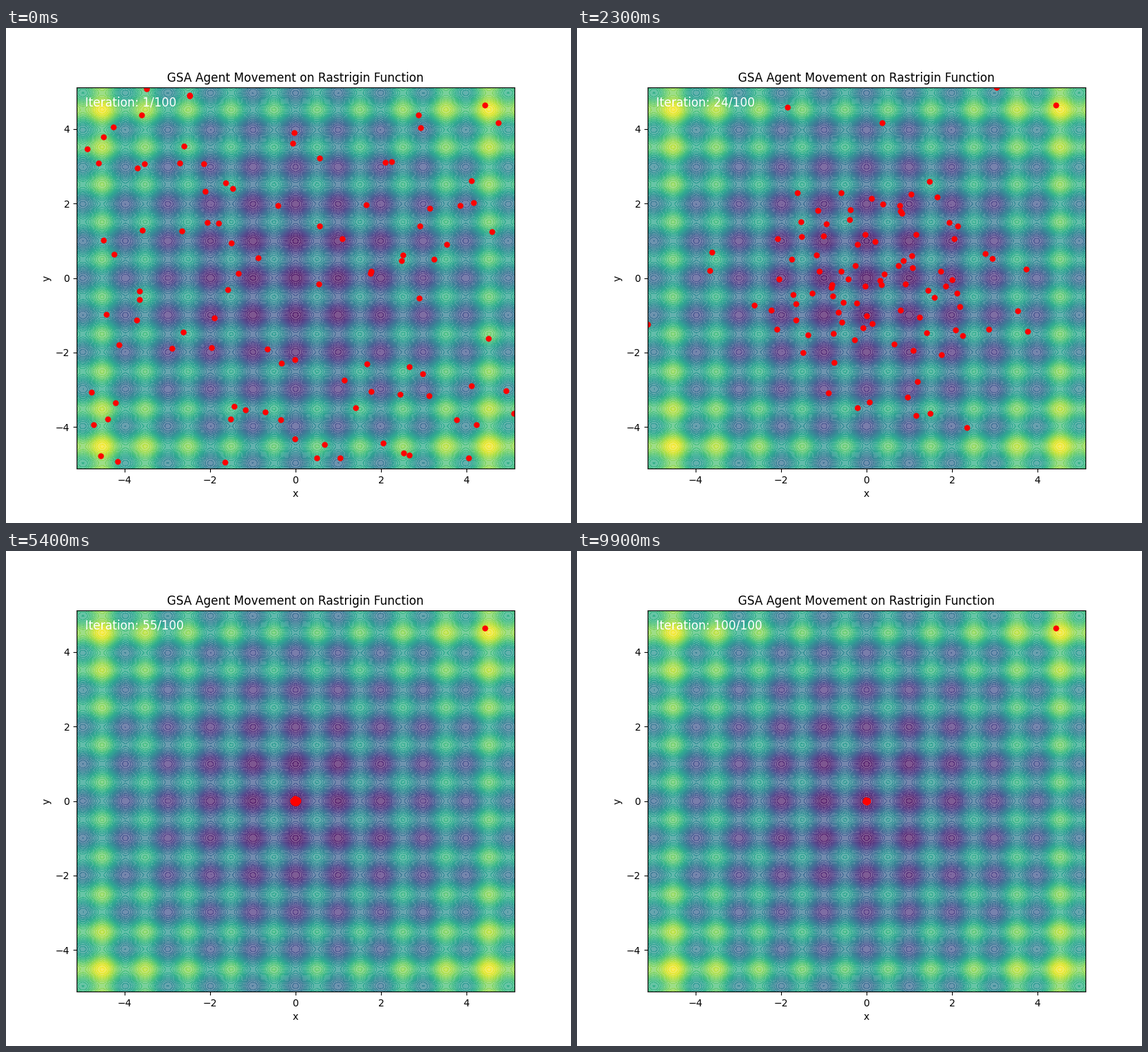
Recreate the animation shown at these times as a matplotlib script. Size 800 by 700 pixels, loop 10000 ms.

```python
import numpy as np
import matplotlib.pyplot as plt
from matplotlib.animation import FuncAnimation

LIM = 5.12
STEPS = 100
AGENTS = 99
PINNED = (4.43, 4.64)  # the weakest agent never moves
SETTLED = 56           # from here on the swarm only shrinks


def rastrigin(x, y):
    return (20 + x**2 - 10 * np.cos(2 * np.pi * x)
            + y**2 - 10 * np.cos(2 * np.pi * y))


def agent_tracks(seed=11):
    """Noisy damped swings about the optimum inside a shrinking envelope."""
    rng = np.random.default_rng(seed)
    start = rng.uniform(-LIM, LIM, (AGENTS, 2))

    swing = rng.normal(size=(STEPS, AGENTS, 2))
    for t in range(2, SETTLED):
        swing[t] = 0.5 * swing[t - 1] - 0.5 * swing[t - 2] + 0.816 * swing[t]
    swing[SETTLED:] = swing[SETTLED - 1]

    spread = np.exp(np.interp(np.arange(STEPS), [1, 15, 23, 37, 54, 75],
                              np.log([30, 8, 1.55, 0.22, 0.022, 0.008])))
    weight = rng.lognormal(0, 0.2, AGENTS)
    tracks = np.clip(spread[:, None, None] * weight[:, None] * swing, -LIM, LIM)
    tracks[0] = start
    tracks[:, 0] = PINNED
    return tracks


def bake_contours(fig, ax):
    """Render the filled contours once and keep them as a pixel-exact image."""
    axis = np.linspace(-LIM, LIM, 200)
    x, y = np.meshgrid(axis, axis)
    contours = ax.contourf(x, y, rastrigin(x, y), levels=50, cmap="viridis",
                           alpha=0.7)
    ax.set_axis_off()
    fig.canvas.draw()
    pixels = np.asarray(fig.canvas.buffer_rgba())[84:623, 100:720].copy()
    contours.remove()
    ax.set_axis_on()
    ax.imshow(pixels, extent=(-LIM, LIM, -LIM, LIM), aspect="auto",
              interpolation="nearest")


fig, ax = plt.subplots(figsize=(8, 7), dpi=100)
ax.set(xlim=(-LIM, LIM), ylim=(-LIM, LIM))
bake_contours(fig, ax)
ax.set(xlim=(-LIM, LIM), ylim=(-LIM, LIM), xlabel="x", ylabel="y",
       title="GSA Agent Movement on Rastrigin Function")

tracks = agent_tracks()
dots, = ax.plot(*tracks[0].T, "ro", markersize=5)
label = ax.text(0.02, 0.95, "", transform=ax.transAxes, fontsize=12,
                color="white")


def update(step):
    dots.set_data(*tracks[step].T)
    label.set_text(f"Iteration: {step + 1}/{STEPS}")
    return dots, label


anim = FuncAnimation(fig, update, frames=STEPS, interval=100, repeat=True,
                     repeat_delay=0)
plt.show()
```
